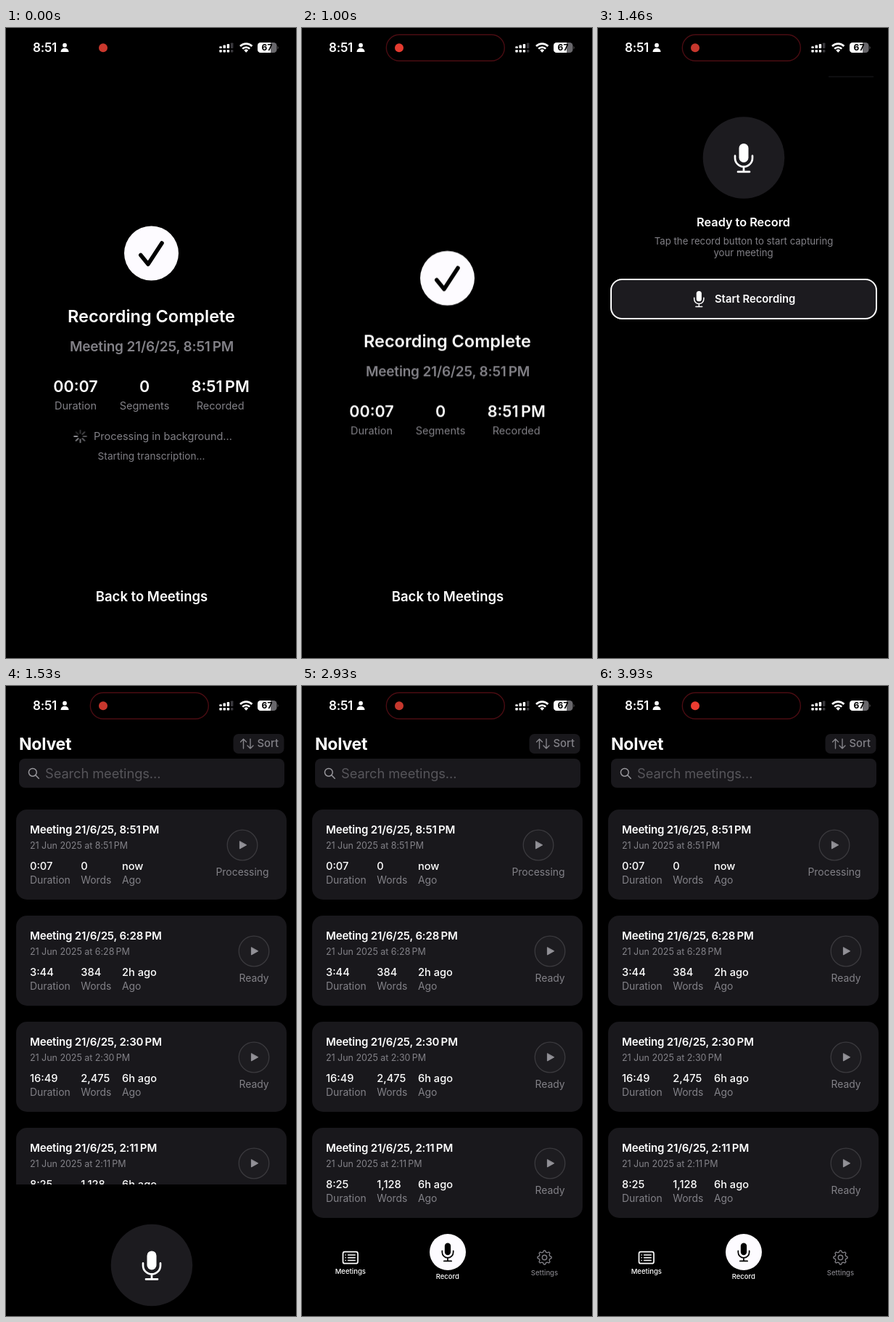
An HTML page for the animation above (4 s loop, 400 by 867 pixels).

```html
<!DOCTYPE html>
<html lang="en">
<head>
<meta charset="utf-8">
<title>Meeting recorder</title>
<style>
html, body { margin: 0; width: 100%; height: 100%; overflow: hidden; background: #000; }
svg { display: block; width: 100%; height: 100%; }
text { font-family: Inter, Roboto, "Liberation Sans", sans-serif; font-optical-sizing: none; fill: #fff; white-space: pre; }
.mid { text-anchor: middle; }
.dim { fill: #828187; }
.semi { font-weight: 600; }
.card { fill: #19181c; }
.line { fill: none; stroke-linecap: round; stroke-linejoin: round; }

/* text sizes */
.heading { font-size: 23.5px; font-weight: 600; }
.subtitle { font-size: 19px; font-weight: 600; letter-spacing: -.01em; }
.stat { font-size: 21.5px; font-weight: 600; }
.label { font-size: 14.5px; }
.note { font-size: 13.6px; letter-spacing: .003em; }
.back { font-size: 18.5px; font-weight: 600; }
.ready-title { font-size: 16.3px; font-weight: 600; }
.hint { font-size: 13.2px; letter-spacing: .002em; }
.start { font-size: 14.8px; font-weight: 600; }
.app { font-size: 23px; font-weight: 700; letter-spacing: -.01em; }
.sort { font-size: 14.8px; font-weight: 500; }
.search { font-size: 18.3px; letter-spacing: -.005em; fill: #56555a; }
.name { font-size: 15px; font-weight: 600; letter-spacing: -.011em; }
.date { font-size: 12.5px; letter-spacing: -.003em; }
.value { font-size: 14.6px; font-weight: 500; }
.unit { font-size: 13.9px; }
.tab { font-size: 9.5px; font-weight: 500; }

/* one shared 4 s timeline */
#dot, #ring, #shift, #progress, #complete, #ready, #list, #opening, #tabs {
  animation: 4s linear infinite both;
}
#dot { animation-name: pulse; animation-timing-function: ease-in-out; }
#ring { animation-name: ring; }
#shift { animation-name: shift; animation-timing-function: cubic-bezier(.25, .7, .3, 1); }
#progress { animation-name: progress; }
#complete { animation-name: complete; animation-timing-function: step-end; }
#ready { animation-name: ready; animation-timing-function: step-end; }
#list { animation-name: list; animation-timing-function: step-end; }
#opening { animation-name: opening; animation-timing-function: step-end; }
#tabs { animation-name: tabs; }
#spinner { animation: spin 1s steps(8) infinite; }

@keyframes pulse {
  0% { fill: #ca382d; }
  15.9%, 54.1%, 92.4% { fill: #ff3f33; }
  35%, 73.25% { fill: #c5372d; }
  100% { fill: #e93c31; }
}
@keyframes ring { 0%, 15% { opacity: 0; } 22%, 100% { opacity: 1; } }
@keyframes shift { 0%, 5% { transform: none; } 13%, 100% { transform: translateY(34.3px); } }
@keyframes progress { 0%, 4% { opacity: 1; } 9%, 100% { opacity: 0; } }
@keyframes complete { 0% { visibility: visible; } 31.6%, 100% { visibility: hidden; } }
@keyframes ready { 0% { visibility: hidden; } 31.6% { visibility: visible; } 36.6%, 100% { visibility: hidden; } }
@keyframes list { 0% { visibility: hidden; } 36.6%, 100% { visibility: visible; } }
@keyframes opening { 0% { visibility: hidden; } 36.6% { visibility: visible; } 39.9%, 100% { visibility: hidden; } }
@keyframes tabs { 0%, 39.9% { opacity: 0; } 45%, 100% { opacity: 1; } }
@keyframes spin { to { transform: rotate(360deg); } }
</style>
</head>
<body>
<svg viewBox="0 0 400 867" preserveAspectRatio="none">
  <defs>
    <g id="mic">
      <rect x="-6.5" y="-20" width="13" height="26" rx="6.5" fill="currentColor"/>
      <path class="line" stroke="currentColor" stroke-width="2.7" d="M-12-3v3a12 12 0 0 0 24 0v-3M0 12v7M-8 19h16"/>
    </g>
    <g id="bigmic" color="#fff">
      <circle r="56.3" fill="#1c1b1f"/>
      <use href="#mic" y=".4"/>
    </g>
  </defs>

  <g id="complete">
    <g id="shift">
      <circle cx="200.5" cy="310" r="37.5" fill="#fdfbff"/>
      <path class="line" stroke="#000" stroke-width="5.6" d="M185.8 312.5 196 325l19-29"/>
      <text class="mid heading" x="200.5" y="405">Recording Complete</text>
      <text class="mid subtitle dim" x="201" y="445">Meeting 21/6/25, 8:51&#8201;PM</text>
      <g id="stats"></g>
    </g>
    <g id="progress">
      <g transform="translate(102.5 562)"><g id="spinner"></g></g>
      <text class="label dim" x="121" y="567">Processing in background...</text>
      <text class="mid note dim" x="200.5" y="594">Starting transcription...</text>
    </g>
    <text class="mid back" x="201" y="788.5">Back to Meetings</text>
  </g>

  <g id="ready">
    <path d="M318 67h62" stroke="#1d1c20"/>
    <use href="#bigmic" x="201" y="178.5"/>
    <text class="mid ready-title" x="200.5" y="273">Ready to Record</text>
    <text class="mid hint dim" x="201" y="297.5">Tap the record button to start capturing</text>
    <text class="mid hint dim" x="200.5" y="313.5">your meeting</text>
    <rect x="18" y="346" width="366" height="54" rx="15" fill="#1c1b1f" stroke="#fff" stroke-width="2"/>
    <use href="#mic" color="#fff" transform="translate(139.3 373) scale(.55)"/>
    <text class="start" x="161" y="378.3">Start Recording</text>
  </g>

  <g id="list">
    <text class="app" x="18" y="88">Nolvet</text>
    <rect class="card" x="313.5" y="66" width="70" height="27" rx="7"/>
    <path class="line" stroke="#85848a" stroke-width="1.4" d="M327.5 86V73m-4 4 4-4 4 4M337 73v13m-4-4 4 4 4-4"/>
    <text class="sort dim" x="346.5" y="84.3">Sort</text>
    <rect class="card" x="18" y="100" width="366" height="40" rx="8"/>
    <path class="line" stroke="#98979c" stroke-width="1.5" d="m40.8 122.8 4.4 4.4"/>
    <circle cx="36.8" cy="118.8" r="5.4" fill="none" stroke="#98979c" stroke-width="1.5"/>
    <text class="search" x="54" y="127">Search meetings...</text>
    <g id="cards"></g>
  </g>

  <g id="opening">
    <path d="M0 686h400v181H0z"/>
    <use href="#bigmic" x="201" y="797"/>
  </g>

  <g id="tabs">
    <rect class="line" x="56.5" y="778.7" width="20.5" height="16" rx="2.5" stroke="#fff" stroke-width="1.7"/>
    <path class="line" stroke="#fff" stroke-width="1.5" d="M60 783h.2M63.5 783h9.7M60 786.7h.2M63.5 786.7h9.7M60 790.4h.2M63.5 790.4h9.7"/>
    <text class="mid tab" x="66.8" y="809">Meetings</text>
    <circle cx="201" cy="779" r="25" fill="#fdfbff"/>
    <use href="#mic" color="#000" transform="translate(201 779.3) scale(.64)"/>
    <text class="mid tab" x="200.8" y="815.5">Record</text>
    <path id="gear" class="line" transform="translate(334.5 786.5)" stroke="#7f7e84" stroke-width="1.4"/>
    <circle cx="334.5" cy="786.5" r="3.2" fill="none" stroke="#7f7e84" stroke-width="1.4"/>
    <text class="mid tab dim" x="334.5" y="810.5">Settings</text>
  </g>

  <g id="status">
    <text class="semi" x="37" y="33" font-size="17" letter-spacing="-.2">8:51</text>
    <circle cx="81" cy="23.7" r="2.9" fill="#fff"/>
    <path d="M75.5 33c0-7 11-7 11 0z" fill="#fff"/>
    <rect id="ring" x="116.3" y="9.2" width="163" height="36" rx="18" fill="none" stroke="#4a0c12" stroke-width="1.4"/>
    <circle id="dot" cx="134" cy="27.2" r="6"/>
    <g id="signal"></g>
    <path fill="none" stroke="#fff" stroke-width="2.7" d="M323 25a11.6 11.6 0 0 1 16.4 0M326.2 28.6a7 7 0 0 1 10 0"/>
    <path d="M328.3 30.8a4.1 4.1 0 0 1 5.8 0l-2.9 2.9z" fill="#fff"/>
    <rect x="347" y="20" width="26.5" height="14" rx="4.3" fill="#68676b"/>
    <path d="M351.3 20H365v14h-13.7a4.3 4.3 0 0 1-4.3-4.3v-5.4a4.3 4.3 0 0 1 4.3-4.3z" fill="#fff"/>
    <path d="M374.6 24.7q2 2.3 0 4.6z" fill="#68676b"/>
    <text class="mid" x="360" y="31.4" font-size="12" font-weight="700" style="fill:#000">67</text>
  </g>
</svg>
<script>
const fill = (id, parts) => { document.getElementById(id).innerHTML = parts.join(""); };
const text = (cls, x, y, str) => `<text class="${cls}" x="${x}" y="${y}">${str}</text>`;

fill("stats", [[96, "00:07", "Duration"], [191, "0", "Segments"], [295.7, "8:51\u2009PM", "Recorded"]]
  .map(([x, value, label]) => text("mid stat", x, 501, value) + text("mid label dim", x, 524.5, label)));

// Brightest spoke points left, fading counterclockwise
fill("spinner", Array.from({ length: 8 }, (_, i) =>
  `<path class="line" stroke="#8e8e93" stroke-width="2" opacity="${1 - i * .105}"
    transform="rotate(${270 - i * 45})" d="M0-4.2V-8.3"/>`));

fill("signal", Array.from({ length: 4 }, (_, i) => {
  const x = 294.3 + i * 5.2, h = 2.8 + i * 1.6;
  const bar = (y, height) =>
    `<rect x="${x}" y="${y}" width="3.5" height="${height}" rx=".9" fill="${i < 3 ? "#fff" : "#39383c"}"/>`;
  return bar(28 - h, h) + bar(30, 3.4);
}));

const meetings = [
  ["8:51", "0:07", "0", "now"],
  ["6:28", "3:44", "384", "2h ago"],
  ["2:30", "16:49", "2,475", "6h ago"],
  ["2:11", "8:25", "1,128", "6h ago"]
];

fill("cards", meetings.map(([time, length, words, ago], i) => {
  const cx = i ? 342 : 326;
  const columns = [[33, length, "Duration"], [103.3, words, "Words"], [160, ago, "Ago"]];
  return `<g transform="translate(0 ${170 + i * 146})">
    <rect class="card" x="14" width="373" height="124" rx="15"/>
    ${text("name", 33, 33.3, `Meeting 21/6/25, ${time}\u2009PM`)}
    ${text("date dim", 33, 54.3, `21 Jun 2025 at ${time}\u2009PM`)}
    ${columns.map(([x, value, unit]) => text("value", x, 82.7, value) + text("unit dim", x, 101.7, unit)).join("")}
    <circle cx="${cx}" cy="49" r="20.8" fill="#1d1c20" stroke="#3b3a3e" stroke-width="1.3"/>
    <path class="line" d="M${cx - 3.6} 44v10l9-5z" style="fill:#929197" stroke="#929197"/>
    ${text("mid unit dim", cx, 90.6, i ? "Ready" : "Processing")}
  </g>`;
}));

// Eight-toothed gear outline
const gear = Array.from({ length: 32 }, (_, i) => {
  const a = (i - .5) * Math.PI / 16, r = i % 4 < 2 ? 9.6 : 7.5;
  return `${(r * Math.cos(a)).toFixed(2)} ${(r * Math.sin(a)).toFixed(2)}`;
});
document.getElementById("gear").setAttribute("d", `M${gear.join("L")}Z`);
</script>
</body>
</html>
```
